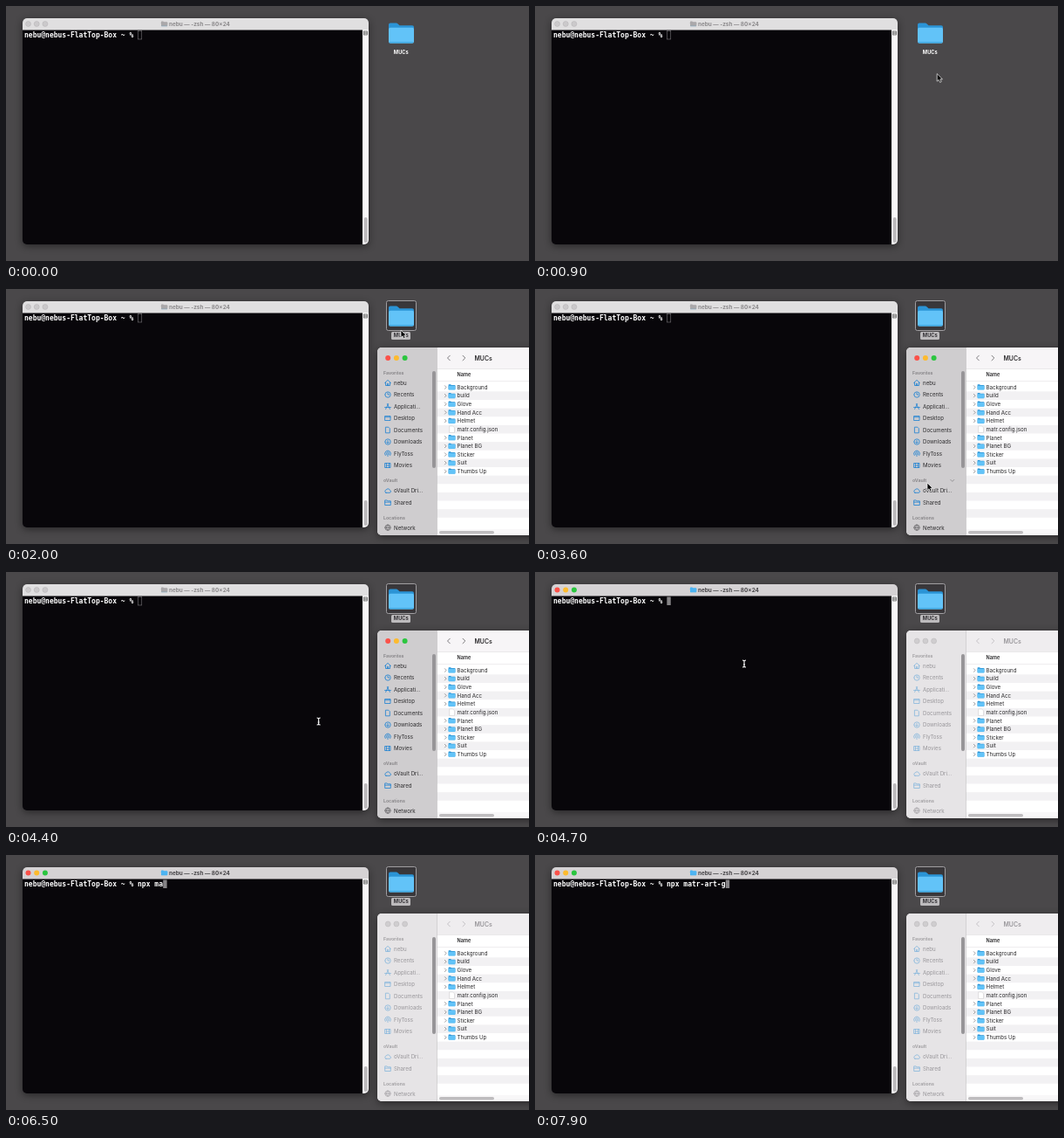
Animation, 600 px wide and 292 px high, one loop 8 s. Source, as an HTML page:

```html
<!DOCTYPE html>
<html lang="en">
<head>
<meta charset="utf-8">
<title>Terminal and folder</title>
<style>
html, body { margin: 0; height: 100%; overflow: hidden; background: #4a484a; }
svg { display: block; width: 100vw; height: 100vh; }
text { font-family: Inter, Roboto, sans-serif; font-size: 6.15px; fill: #262527; white-space: pre; }
.mono { font: bold 8px "DejaVu Sans Mono", "Liberation Mono", monospace; fill: #fff; }
.bold { font-weight: 700; }
.line { fill: none; stroke-width: .8; stroke-linecap: round; stroke-linejoin: round; }
.shadow { filter: drop-shadow(0 2px 4px #0007); }

#term { --bar: #e0dfe0; --title: #8b898b; --a: #cbc9cb; --b: #cbc9cb; --c: #cbc9cb; --rim: #b3b1b3; --icon: #aaa8aa; }
#term.on { --bar: #d5d2d4; --title: #454346; --a: #fb5149; --b: #fdbb2e; --c: #2bc63f; --rim: none; --icon: #4db4f2; }
#finder { --side: #cfcdcf; --top: #f7f5f7; --text: #2c2b2d; --head: #8a888b; --blue: #1b80d2; --gray: #6d6b6e; --nav: #5f5d60;
  --a: #fb5149; --b: #fdbb2e; --c: #2bc63f; --rim: none; }
#finder.off { --side: #e6e4e6; --top: #efedef; --text: #98969a; --head: #a3a1a4; --blue: #86b7dc; --gray: #aaa8ab; --nav: #b9b7ba;
  --a: #cfcdcf; --b: #cfcdcf; --c: #cfcdcf; --rim: #b9b7b9; }
.side { fill: var(--text); }
.head { fill: var(--head); font-size: 5.2px; font-weight: 700; }
</style>
</head>
<body>
<svg id="stage" viewBox="0 0 600 292" preserveAspectRatio="none"></svg>
<script>
const USER = "nebu";
const PROMPT = USER + "@nebus-FlatTop-Box ~ % ";
const COMMAND = "npx matr-art-g";
const LOOP = 8000, OPEN = 1900, FOCUS = 4700, TYPE = 5600, KEY = 175;
const CHAR = 4.816;

const rect = (x, y, w, h, fill, r = 0, more = "") =>
  `<rect x="${x}" y="${y}" width="${w}" height="${h}" rx="${r}" fill="${fill}" ${more}/>`;
const text = (x, y, s, cls = "", more = "") => `<text x="${x}" y="${y}" class="${cls}" ${more}>${s}</text>`;
const line = (d, color, more = "") => `<path class="line" d="${d}" stroke="${color}" ${more}/>`;
const folder = (x, y, w, back = "#2b94d6", front = "#62c3f8") =>
  `<g transform="translate(${x} ${y}) scale(${w / 30})">
    <path d="M0 3q0-2 2-2h7q1 0 2 1l2 2h15q2 0 2 2v16H0z" fill="${back}"/>
    <rect y="6.5" width="30" height="18.5" rx="2" fill="${front}"/>
    <path d="M1 24h28" stroke="#3ba5e2" stroke-width="1"/></g>`;
const lights = (x, y) => ["a", "b", "c"].map((v, i) =>
  `<circle cx="${x + i * 9.7}" cy="${y}" r="3" fill="var(--${v})" stroke="var(--rim)" stroke-width=".5"/>`).join("");

// Sidebar icons, drawn around their own centre
const box = "M-3-2.5H3V2.5H-3z", ring = "M-3.2 0a3.2 3.2 0 1 0 6.4 0a3.2 3.2 0 1 0-6.4 0";
const icons = {
  home: "M-3.4 0L0-3.2L3.4 0M-2.5-.6V3H2.5V-.6M-.6 3V.8H.6V3",
  clock: ring + "M0-2V0H1.6",
  apps: "M-2.4 3L.6-3M2.4 3L-.6-3M-3.4 1H3.4",
  desk: box + "M-3-1.2H3",
  doc: "M-2.2-3.3H.8L2.3-1.8V3.3H-2.2z",
  down: ring + "M0-1.6V1.5M-1.3.3L0 1.6L1.3.3",
  waves: "M-2.8 2A3.4 3.4 0 1 1 2.8 2M-1.4 1A1.7 1.7 0 1 1 1.4 1M0 0V3",
  film: box + "M-1.6-2.5V2.5M1.6-2.5V2.5M-1.6 0H1.6",
  cloud: "M-2 2.3H2.2A1.5 1.5 0 0 0 2.4-.6A2.3 2.3 0 0 0-1.8-1A1.7 1.7 0 0 0-2 2.3z",
  shared: "M-3.3 2.6V-2.6H-1L0-1.7H3.3V2.6zM-3.3-.4H3.3",
  globe: ring + "M-3.2 0H3.2M0-3.2Q-3 0 0 3.2Q3 0 0-3.2"
};
const places = [
  [107.5, USER, "home"], [121, "Recents", "clock"], [134.5, "Applicati…", "apps"], [148, "Desktop", "desk"],
  [161.5, "Documents", "doc"], [175, "Downloads", "down"], [188.5, "FlyToss", "waves"], [202, "Movies", "film"],
  [231, "oVault Dri…", "cloud"], [244.5, "Shared", "shared"], [273.2, "Network", "globe"]
].map(([y, name, icon]) =>
  line(icons[icon], icon == "globe" ? "var(--gray)" : "var(--blue)", `transform="translate(438 ${y})"`) +
  text(445, y + 2.3, name, "side")).join("");

const files = ["Background", "build", "Glove", "Hand Acc", "Helmet", "matr.config.json",
  "Planet", "Planet BG", "Sticker", "Suit", "Thumbs Up"];
let rows = "";
for (let i = 0; i < 17; i++) {
  const y = 112.5 + i * 9.63, name = files[i];
  if (i % 2) rows += rect(494, y - 4.8, 106, 9.63, "#f2f1f3");
  if (!name) continue;
  rows += text(517.6, y + 2.3, name);
  rows += name.endsWith(".json")
    ? `<path d="M508.7 ${y - 3.8}h3.8l2 2v5.6h-5.8z" fill="#fff" stroke="#c4c2c4" stroke-width=".5"/>`
    : line(`M503.4 ${y - 1.8}l1.8 1.8l-1.8 1.8`, "#858386") + folder(507.6, y - 3.5, 7.8);
}

stage.innerHTML = `
<clipPath id="termClip"><rect x="19" y="14" width="397" height="259" rx="5"/></clipPath>
<clipPath id="finderClip"><rect x="426" y="67" width="190" height="215" rx="5"/></clipPath>
<g id="term">
  ${rect(19, 14, 397, 259, "#08060a", 5, 'class="shadow"')}
  <g clip-path="url(#termClip)">
    ${rect(19, 14, 397, 13.5, "var(--bar)")}
    ${rect(409, 27, 7, 246, "#f9f8f9")}
    ${rect(410.7, 242, 4, 29, "#bcbabc", 2)}
    ${rect(410.5, 29, 4, 4, "#ddd", 0, 'stroke="#555" stroke-width=".7"')}
    ${line("M411.2 31h2.6", "#555")}
    ${lights(25.5, 20.5)}
    ${folder(178, 17.2, 7.2, "var(--icon)", "var(--icon)")}
    ${text(187, 22.8, USER + " — -zsh — 80×24", "bold", 'style="fill:var(--title);font-size:6.4px"')}
    ${text(21, 35.6, "", "mono", 'id="shell"')}
    <rect id="caret" y="28.5" width="4.4" height="9.5" stroke-width=".6"/>
  </g>
</g>
<g id="pick">${rect(436.5, 13.5, 34, 34, "#39373a", 2, 'stroke="#a09ea1" stroke-width="1"')}
  <rect id="tag" x="442" y="49" width="22" height="9" rx="1.5"/></g>
${folder(439, 18.5, 29)}
${text(453.3, 55.4, "MUCs", "bold", 'id="label" text-anchor="middle" style="font-size:5.7px"')}
<g id="finder">
  ${rect(426, 67, 190, 215, "#fff", 5, 'class="shadow"')}
  <g clip-path="url(#finderClip)">
    ${rect(494, 67, 106, 24, "var(--top)")}
    ${rect(494, 91, 106, .6, "#dddbdd")}
    ${rect(494, 105, 106, .6, "#e4e2e4")}
    ${rows}
    ${rect(494, 275, 106, 7, "#f8f7f8")}
    ${rect(497, 277, 63, 3.6, "#bfbdbf", 1.8)}
    ${rect(426, 67, 68.5, 215, "var(--side)")}
    ${rect(494, 67, .6, 215, "#c3c1c3")}
    ${rect(489, 94, 4, 111, "#979598", 2)}
    ${lights(438.2, 79)}
    ${line("M509.3 76.2l-2.8 2.8l2.8 2.8", "var(--nav)")}
    ${line("M524 76.2l2.8 2.8l-2.8 2.8", "var(--nav)")}
    ${text(537.5, 81.5, "MUCs", "side", 'style="font-size:6.9px;font-weight:600"')}
    ${text(517.6, 100, "Name", "", 'style="font-size:5.5px;font-weight:600"')}
    ${text(433, 98.4, "Favorites", "head")}
    ${text(433, 221.4, "oVault", "head")}
    ${text(433, 264, "Locations", "head")}
    ${line("M476.8 218.4l2 2l2-2", "var(--head)", 'id="fold"')}
    ${places}
  </g>
</g>
<path id="arrow" d="M0 0V8.6L2 6.8L3.4 9.8L5 9.1L3.7 6.2H6.3z" fill="#000" stroke="#fff" stroke-width=".7"/>
<g id="beam" fill="none"><path d="M-2-4Q0-4 0-3Q0-4 2-4M0-3V3M-2 4Q0 4 0 3Q0 4 2 4M-1 1H1" stroke="#fff" stroke-width="1.1"/></g>`;

const $ = id => document.getElementById(id);
const show = (id, on) => $(id).style.display = on ? "" : "none";

// Pointer path: time, x, y
const path = [
  [100, 375, 236], [300, 382, 215], [700, 445, 110], [950, 463, 74], [1400, 459, 39], [1800, 459, 39],
  [2000, 453, 47], [2500, 453, 47], [3100, 446, 238], [3300, 445, 238], [3600, 450, 222],
  [3800, 447, 236], [4100, 445, 232], [4500, 343, 160], [4700, 240, 105], [LOOP, 240, 105]
];
function pointer(t) {
  const i = Math.max(1, path.findIndex(p => p[0] > t));
  const [t0, x0, y0] = path[i - 1], [t1, x1, y1] = path[i];
  let k = Math.max(0, (t - t0) / (t1 - t0));
  k = k * k * (3 - 2 * k);
  return [x0 + (x1 - x0) * k, y0 + (y1 - y0) * k];
}

function draw(t) {
  const open = t >= OPEN, focus = t >= FOCUS;
  const typed = Math.max(0, Math.min(COMMAND.length, Math.floor((t - TYPE) / KEY) + 1));
  $("term").classList.toggle("on", focus);
  $("finder").classList.toggle("off", focus);
  show("finder", open);
  show("pick", t >= 1500);
  $("tag").setAttribute("fill", open ? "#bdbbbd" : "#1558cf");
  $("label").style.fill = open ? "#343236" : "#fff";

  $("shell").textContent = PROMPT + COMMAND.slice(0, typed);
  const caret = $("caret");
  caret.setAttribute("x", 21.3 + (PROMPT.length + typed) * CHAR);
  caret.setAttribute("fill", focus ? "#858386" : "none");
  caret.setAttribute("stroke", focus ? "none" : "#777578");

  const [x, y] = pointer(t), inTerm = x < 409, visible = t >= 200 && t < TYPE;
  for (const id of ["arrow", "beam"]) {
    show(id, visible && inTerm == (id == "beam"));
    $(id).setAttribute("transform", `translate(${x} ${y})`);
  }
  show("fold", open && x > 426 && y > 213 && y < 252);
}

const start = performance.now();
function tick() {
  draw((performance.now() - start) % LOOP);
  requestAnimationFrame(tick);
}
tick();
</script>
</body>
</html>
```
